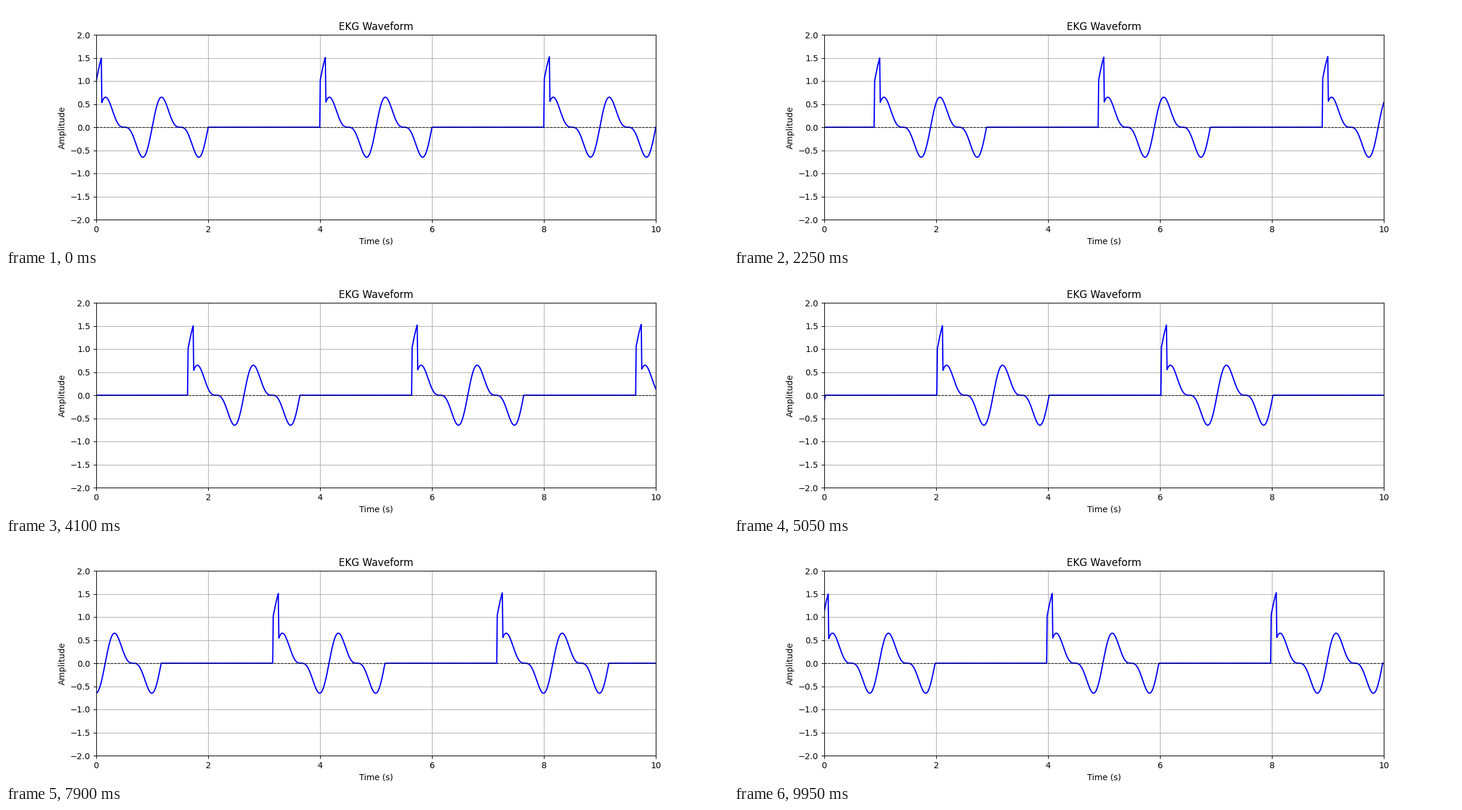
A matplotlib script for the animation above (10 s loop, 1200 px wide and 400 px high).

```python
import numpy as np
import matplotlib.pyplot as plt
from matplotlib.animation import FuncAnimation

FRAMES = 200
INTERVAL = 50  # ms
PERIOD = 4.0   # seconds between beats


def heartbeat(t):
    """Two-second wave with a short spike at its start, then two seconds of rest."""
    phase = t % PERIOD
    wave = 0.5 * np.sin(2 * np.pi * phase) + 0.25 * np.sin(4 * np.pi * phase)
    return np.where(phase < 2, wave, 0) + np.where(phase < 0.1, 1.0, 0)


time = np.linspace(0, 10, 1000)

fig, ax = plt.subplots(figsize=(12, 4), dpi=100)
line, = ax.plot(time, heartbeat(time), color="blue")
ax.axhline(0, color="black", linewidth=0.8, linestyle="--")
ax.set(xlim=(0, 10), ylim=(-2, 2), title="EKG Waveform",
       xlabel="Time (s)", ylabel="Amplitude")
ax.grid(True)


def update(frame):
    line.set_ydata(heartbeat(time - PERIOD * frame / FRAMES))
    return line,


animation = FuncAnimation(fig, update, frames=FRAMES, interval=INTERVAL,
                          repeat=True, repeat_delay=0)
plt.show()
```
